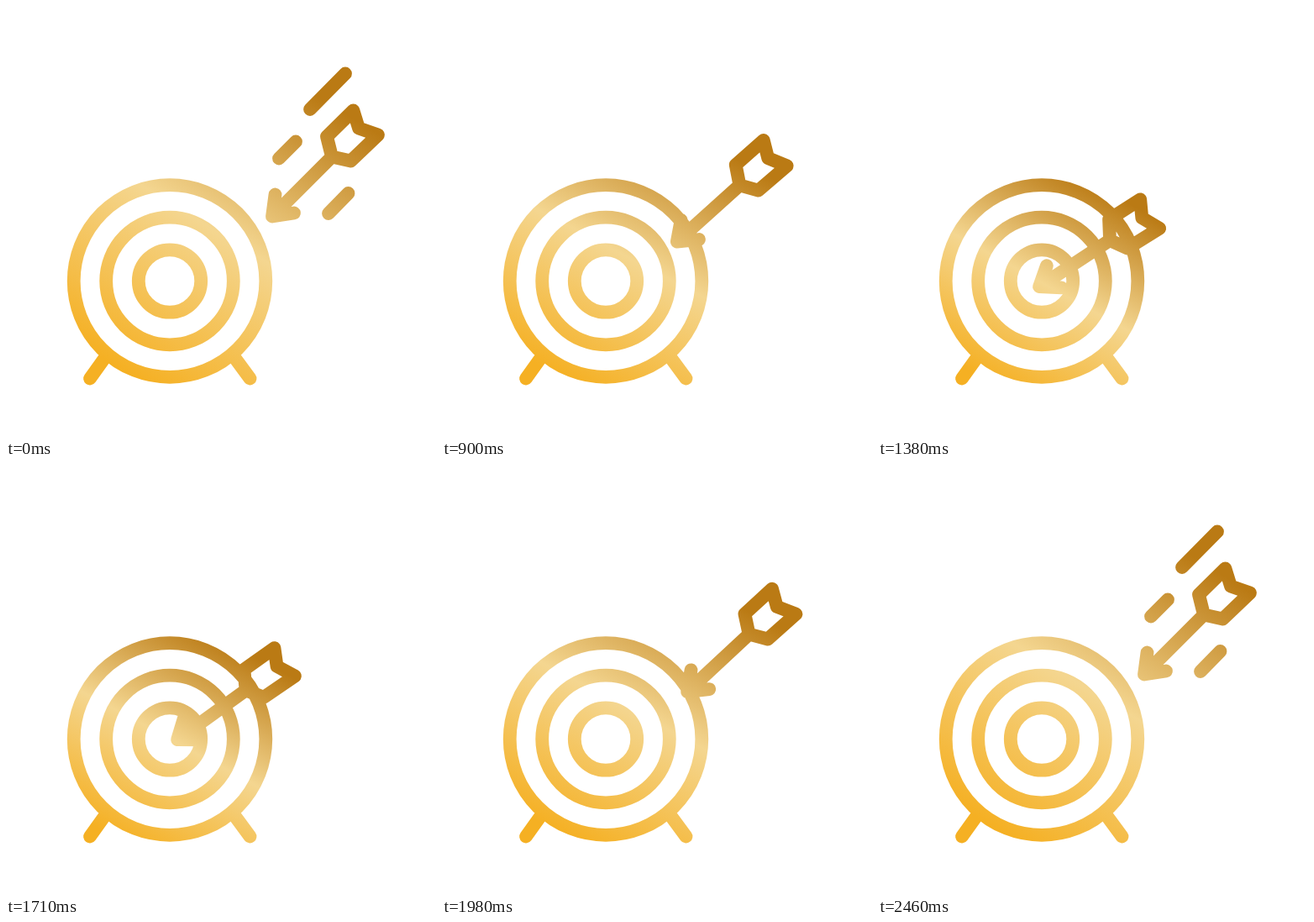
These frames come from a looping animation (512x512 px, 2490 ms). An HTML page with a canvas:

```html
<!DOCTYPE html>
<html lang="en">
<head>
<meta charset="utf-8">
<title>Arrow and target</title>
<style>
  html, body { margin: 0; height: 100%; overflow: hidden; background: #fff; }
  canvas { display: block; width: 100vmin; height: 100vmin; }
</style>
</head>
<body>
<canvas width="512" height="512"></canvas>
<script>
const ctx = document.querySelector('canvas').getContext('2d');
const LOOP = 2490, WIDTH = 15.8, HALF = 8;

const CENTER = [195, 327.5], RADII = [114.3, 75.8, 37.2];
const LEGS = [[[119, 417], [100, 443.5]], [[271, 417], [290.5, 443.5]]];

// Arrow outlines, relative to the tip
const FLETCH = [[65, -95], [96.5, -126], [103, -105], [126, -97], [93.5, -66], [71, -71]];
const HEAD = [[3.5, -26], [0, 0], [26, -4]];
const SHAFT = [[0, 0], [71, -71]];

// Speed lines: front end, tail end
const DASHES = [[[362, 123], [404, 80.5]], [[325, 181.5], [345, 161.5]], [[384, 247], [407.5, 223]]];

const AWAY = [317, 250.5], HIT = [190, 335], SAG = 26, TILT = 10.3;

// Runs from upper right to lower left in a unit box
const gold = ctx.createLinearGradient(0.75, 0.07, 0.2, 0.97);
['#ba7a14', '#f4d690', '#f5b023'].forEach((color, i) => gold.addColorStop(i / 2, color));

const mix = (a, b, k) => a + (b - a) * k;
const ramp = (t, from, to) => Math.min(1, Math.max(0, (t - from) / (to - from)));
const easeOut = p => 1 - (1 - p) ** 2;

function wobble(t) {
  const u = ramp(t, 1125, 1530);
  return Math.sin(4 * Math.PI * u) * (1 - u);
}

function arrowPose(t) {
  const shake = wobble(t);
  const k = t < 1680 ? ramp(t, 600, 1110) ** 2.33 - 0.045 * shake
                     : 1 - easeOut(ramp(t, 1680, 2220));
  return {
    x: mix(AWAY[0], HIT[0], k),
    y: mix(AWAY[1], HIT[1], k) + SAG * k * (1 - k),
    angle: (TILT * k + 4.4 * shake) * Math.PI / 180
  };
}

function draw(t) {
  const path = new Path2D();
  const left = 73, bottom = 451;
  let top = 205, right = 317.5;

  const line = (points, closed) => {
    points.forEach(([x, y], i) => {
      i ? path.lineTo(x, y) : path.moveTo(x, y);
      top = Math.min(top, y - HALF);
      right = Math.max(right, x + HALF);
    });
    if (closed) path.closePath();
  };

  for (const r of RADII) {
    path.moveTo(CENTER[0] + r, CENTER[1]);
    path.arc(...CENTER, r, 0, 2 * Math.PI);
  }
  LEGS.forEach(leg => line(leg));

  const { x, y, angle } = arrowPose(t);
  const c = Math.cos(angle), s = Math.sin(angle);
  const place = points => points.map(([px, py]) => [x + px * c - py * s, y + px * s + py * c]);
  line(place(FLETCH), true);
  line(place(HEAD));
  line(place(SHAFT));

  const length = t < 1680 ? 1 - ramp(t, 570, 810) ** 2 : easeOut(ramp(t, 2220, 2460));
  if (length > 0) {
    for (const [front, tail] of DASHES) {
      line([front, front.map((v, i) => mix(v, tail[i], length))]);
    }
  }

  // Impact sparks on both sides of the tip
  if (t >= 1135 && t < 1260) {
    const out = 26 + (t - 1170) * 0.1;
    for (const side of [-1, 1]) {
      const sx = 197.5 + side * out * 0.41, sy = 326.5 + side * out * 0.91;
      line([[sx, sy], [sx, sy + 0.01]]);
    }
  }

  ctx.clearRect(0, 0, 512, 512);
  ctx.lineWidth = WIDTH;
  ctx.lineCap = ctx.lineJoin = 'round';
  ctx.stroke(path);

  // Colour the strokes with the gradient stretched over their bounding box
  ctx.save();
  ctx.globalCompositeOperation = 'source-in';
  ctx.translate(left, top);
  ctx.scale(right - left, bottom - top);
  ctx.fillStyle = gold;
  ctx.fillRect(-1, -1, 3, 3);
  ctx.restore();
}

const start = performance.now();
function tick() {
  draw((performance.now() - start) % LOOP);
  requestAnimationFrame(tick);
}
tick();
</script>
</body>
</html>
```
